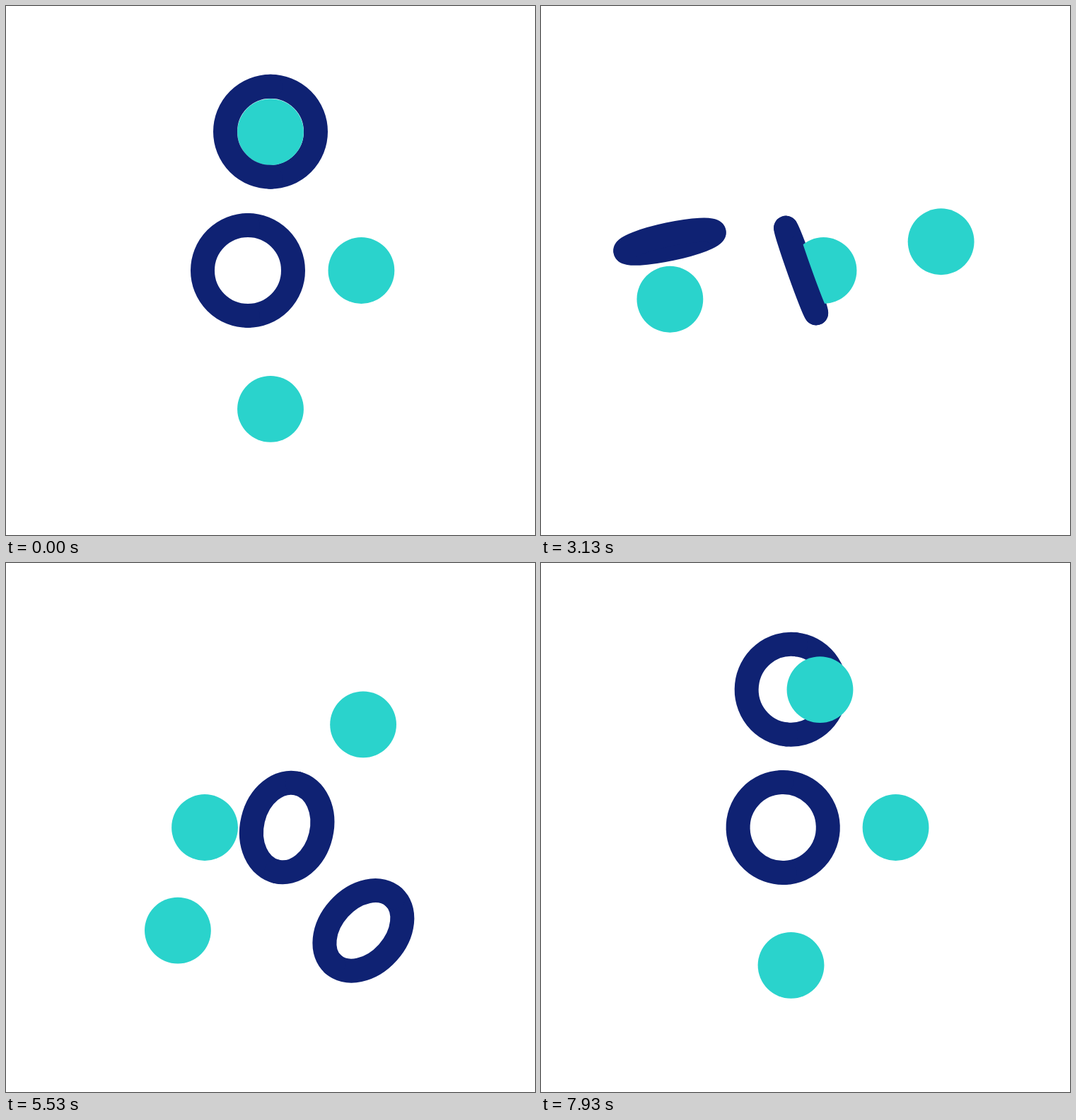
Animation of 748x748 px, one loop 8010 ms. Source, as an HTML page with a canvas:

```html
<!DOCTYPE html>
<html lang="en">
<head>
<meta charset="utf-8">
<title>Rings and balls</title>
<style>
html, body { margin: 0; width: 100%; height: 100%; overflow: hidden; background: #fff; }
canvas { display: block; width: 100vmin; height: 100vmin; }
</style>
</head>
<body>
<canvas id="stage" width="748" height="748"></canvas>
<script>
const ctx = document.getElementById('stage').getContext('2d');
const NAVY = '#0f2273', TEAL = '#2ad3cc';
const LOOP = 8010, TURN = 120, HALF = 60;
const MID = 374, RING = 64, BAND = 34, BALL = 46.9;

// Cubic easing with flat ends; x1 and x2 are the handle positions.
function ease(p, x1, x2) {
  let lo = 0, hi = 1, s = p;
  for (let i = 0; i < 24; i++) {
    s = (lo + hi) / 2;
    const r = 1 - s;
    if (3 * r * r * s * x1 + 3 * r * s * s * x2 + s * s * s < p) lo = s; else hi = s;
  }
  return s * s * (3 - 2 * s);
}

// Goes from 1 to -1 and back to 1 within one turn.
function swing(n, out, back) {
  return n < HALF
    ? 1 - 2 * ease(n / HALF, ...out)
    : 2 * ease((n - HALF) / HALF, ...back) - 1;
}

// One half of a turning ring; the front half changes side as the ring flips.
function halfRing(ring, front) {
  const left = (ring.flip >= 0) === front;
  const start = left ? Math.PI / 2 : -Math.PI / 2;
  ctx.save();
  ctx.translate(ring.x, ring.y);
  ctx.rotate(ring.tilt);
  ctx.beginPath();
  ctx.ellipse(0, 0, Math.max(RING * Math.abs(ring.flip), 0.8), RING, 0, start, start + Math.PI);
  ctx.stroke();
  ctx.restore();
}

function ball(x, y) {
  ctx.beginPath();
  ctx.arc(x, y, BALL, 0, Math.PI * 2);
  ctx.fill();
}

function draw(step) {
  const n = step % TURN;
  const a = n / TURN * Math.PI * 2;
  const sin = Math.sin(a), cos = Math.cos(a);
  const soft = [1 / 3, 2 / 3];
  const slide = swing(n, soft, soft);

  const rings = [
    { x: MID + 196.3 * sin, y: MID - 196.3 * cos, tilt: -a,
      flip: swing(n, soft, [1 / 6, 5 / 6]) },
    { x: MID - 32 * slide, y: MID, tilt: sin * Math.PI / 9,
      flip: swing(n, [0.3, 0.62], [0.5, 0.65]) }
  ];

  ctx.fillStyle = '#fff';
  ctx.fillRect(0, 0, 748, 748);
  ctx.strokeStyle = NAVY;
  ctx.lineWidth = BAND;
  ctx.lineCap = ctx.lineJoin = 'round';
  ctx.fillStyle = TEAL;

  rings.forEach(r => halfRing(r, false));
  ball(MID - 195.9 * sin, MID - 195.9 * cos);
  ball(MID + 195.9 * sin, MID + 195.9 * cos);
  ball(MID + 128.4 * slide, MID);
  rings.forEach(r => halfRing(r, true));
}

// Two poses per 100 ms: the first stays 30 ms, the second 70 ms.
function stepAt(ms) {
  const t = Math.min(ms % LOOP, 7999);
  return 3 * Math.floor(t / 100) + (t % 100 >= 30 ? 1 : 0);
}

const t0 = performance.now();
function tick() {
  draw(stepAt(performance.now() - t0));
  requestAnimationFrame(tick);
}
tick();
</script>
</body>
</html>
```
